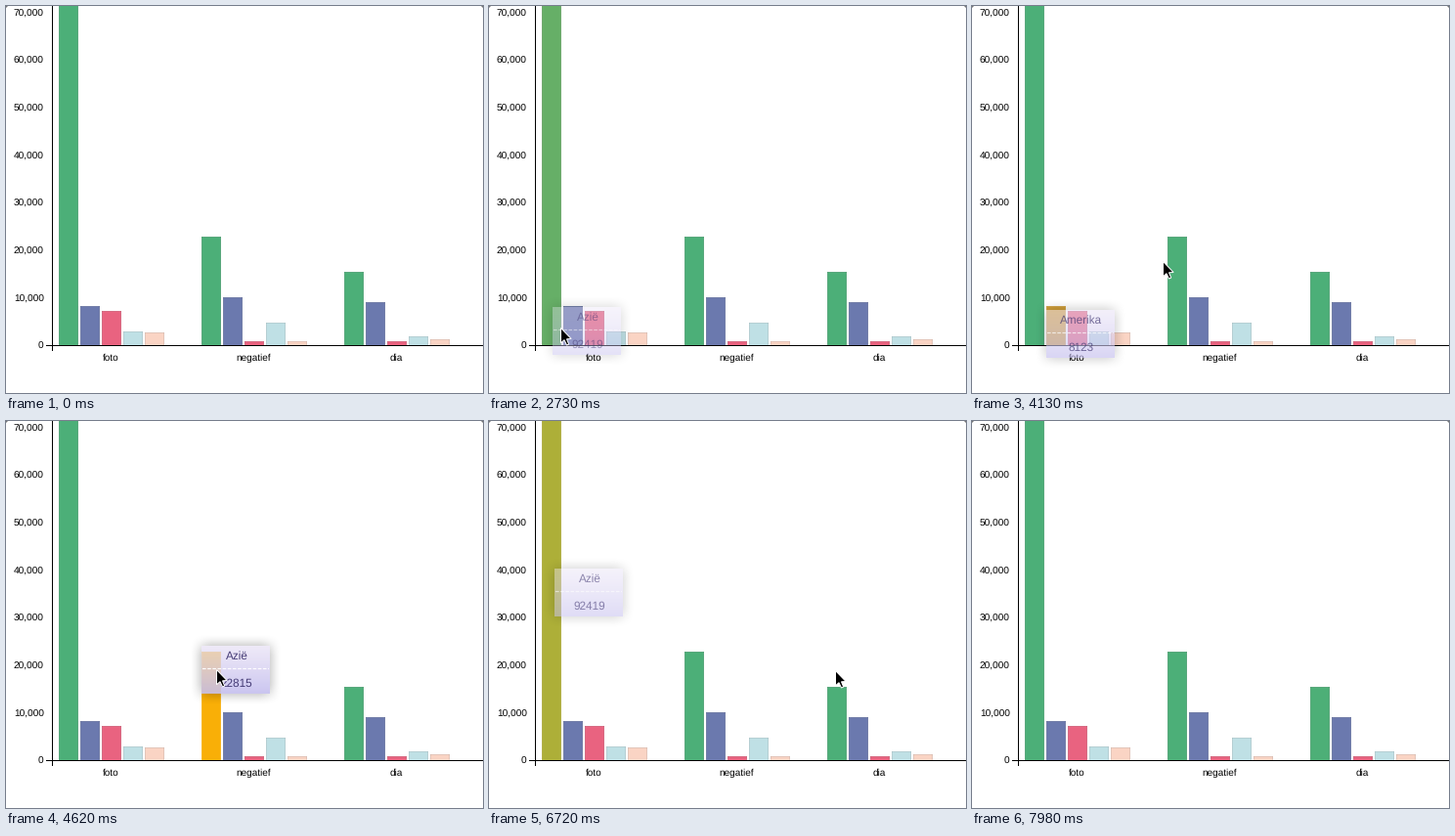
Animation, 488 px wide and 396 px high, one loop 8.19 s. Source, as a matplotlib script:

```python
import numpy as np
import matplotlib.pyplot as plt
from matplotlib.animation import FuncAnimation
from matplotlib.patches import Polygon, Rectangle

W, H, STEP, FRAMES = 488, 396, 70, 117
BASE, UNIT = 347, 48.67  # zero line and pixels per 10,000
TIP_W, TIP_H, PAD = 70, 49, 12

plt.rcParams["font.family"] = "Liberation Sans"
plt.rcParams["text.hinting"] = "none"


def rgb(r, g, b):
    return np.array([r, g, b]) / 255


COLORS = [rgb(76, 175, 120), rgb(107, 121, 174), rgb(233, 99, 128),
          rgb(191, 224, 229), rgb(250, 212, 196)]
HIGHLIGHT = rgb(252, 175, 5)
INK = rgb(62, 52, 112)

COUNTS = {"foto": [92419, 8123, 7200, 2870, 2670],
          "negatief": [22815, 10070, 820, 4730, 820],
          "dia": [15483, 9040, 820, 1850, 1230]}

# enter time, leave time, group, series
HOVERS = [(2550, 2790, "foto", 0), (2800, 3900, "foto", 1),
          (4170, 5280, "negatief", 0), (5770, 6460, "foto", 0),
          (6830, 7500, "dia", 0)]
NAMES = ["Azië", "Amerika"]

# time, x, y where the pointer turns or rests
STOPS = np.array([
    (840, 104, 400), (1540, 65, 336), (2550, 65, 336), (2730, 73, 329),
    (2800, 76, 339), (3000, 87, 331), (3850, 87, 331), (4170, 200, 258),
    (4400, 215, 254), (5180, 215, 254), (5770, 67, 179), (5950, 55, 158),
    (6400, 55, 158), (6720, 354, 255), (6830, 346, 288), (7420, 346, 288),
    (7630, 349, 420)])

ARROW = np.array([(0, 0), (0, 15.3), (3.5, 12.2), (6, 17.5), (8.2, 16.6),
                  (6, 11.3), (10.6, 11)]) + 0.5


def pointer_at(t):
    times, points = STOPS[:, 0], STOPS[:, 1:]
    t = np.clip(t, times[0], times[-1])
    i = min(np.searchsorted(times, t, "right"), len(times) - 1)
    u = (t - times[i - 1]) / (times[i] - times[i - 1])
    spot = points[i - 1] + (points[i] - points[i - 1]) * u * u * (3 - 2 * u)
    # one quick sway away from the bar and back
    sway = 1 - np.cos(2 * np.pi * np.clip((t - 1960) / 350, 0, 1))
    return np.round(spot - sway * np.array([10.5, 15]))


def ease(u):
    u = min(max(u, 0), 1)
    return 4 * u ** 3 if u < 0.5 else 1 - 4 * (1 - u) ** 3


def faded(events, t):
    """Value after a chain of (start, goal, duration) transitions."""
    value = 0.0
    for i, (start, goal, duration) in enumerate(events):
        if t < start:
            break
        end = min(t, events[i + 1][0]) if i + 1 < len(events) else t
        value += (goal - value) * ease((end - start) / duration)
    return value


def transitions(hovers, fade_in, fade_out, peak):
    return [event for enter, leave, *_ in hovers
            for event in ((enter, peak, fade_in), (leave, 0, fade_out))]


def tooltip_image():
    ys, xs = np.mgrid[0:TIP_H + 2 * PAD, 0:TIP_W + 2 * PAD] + 0.5
    dx = np.abs(xs - TIP_W / 2 - PAD) - TIP_W / 2
    dy = np.abs(ys - TIP_H / 2 - PAD) - TIP_H / 2
    inside = (dx < 0) & (dy < 0)
    down = np.clip((ys - PAD) / TIP_H, 0, 1)

    def blur(d):
        return 0.5 - 0.5 * np.sin(np.pi / 2 * np.clip(d / 13, -1, 1))

    shadow = 0.36 * blur(dx) * blur(dy)
    image = np.zeros(xs.shape + (4,))
    tint = (rgb(232, 225, 246) * (1 - down[..., None])
            + rgb(196, 190, 238) * down[..., None])
    image[..., :3] = np.where(inside[..., None], tint, 0)
    image[..., 3] = np.where(inside, 0.74 + 0.2 * down, shadow)
    return image


fig = plt.figure(figsize=(W / 72, H / 72), dpi=72, facecolor="white")
ax = fig.add_axes([0, 0, 1, 1])
ax.axis("off")

bars = {}
for g, (label, counts) in enumerate(COUNTS.items()):
    left = 54 + 146 * g
    for s, count in enumerate(counts):
        height = round(count / 10000 * UNIT)
        bars[label, s] = ax.add_patch(Rectangle(
            (left + 22 * s + 0.25, BASE - height + 0.25), 19.5, height,
            fc=COLORS[s], ec=COLORS[s] * 0.82, lw=0.5, snap=False))
    ax.text(left + 53.5, 363, label, size=10, ha="center", va="baseline")

axis_style = dict(color="black", lw=1, snap=False, solid_capstyle="butt")
ax.plot([47.5, 47.5], [-5, 353], **axis_style)
ax.plot([41, W + 5], [BASE + 0.5] * 2, **axis_style)
for n in range(8):
    ax.text(38.7, BASE + 4 - n * UNIT, f"{n * 10000:,}", size=10.1,
            ha="right", va="baseline")
for x, side in ((0, 1), (W, -1)):
    ax.add_patch(Polygon([(x, 0), (x + 2 * side, 0), (x, 2)],
                         fc="#777777", lw=0))

tip_pixels = tooltip_image()
tip = ax.imshow(tip_pixels, extent=(0, 1, 1, 0), interpolation="nearest",
                aspect="auto", zorder=5)
divider, = ax.plot([], [], color="white", lw=1.2, dashes=(3, 1.3),
                   dash_capstyle="butt", snap=False, zorder=6)
name_text, value_text = [ax.text(0, 0, "", size=11.7, color=INK, ha="center",
                                 va="baseline", zorder=6) for _ in range(2)]
pointer = ax.add_patch(Polygon(ARROW, fc="black", ec="white", lw=1,
                               joinstyle="miter", zorder=9))
ax.set_xlim(0, W)
ax.set_ylim(H, 0)

TIP_EVENTS = transitions(HOVERS, 360, 560, 0.95)
BAR_EVENTS = {key: transitions([h for h in HOVERS if h[2:] == key],
                               540, 540, 1)
              for key in {h[2:] for h in HOVERS}}


def draw_tooltip(t):
    shown = [h for h in HOVERS if h[0] <= t]
    opacity = faded(TIP_EVENTS, t)
    visible = bool(shown) and opacity > 0.015
    for part in (tip, divider, name_text, value_text):
        part.set_visible(visible)
    if not visible:
        return
    enter, _, group, series = shown[-1]
    x, y = pointer_at(enter) - (0, 28)
    image = tip_pixels.copy()
    image[..., 3] *= opacity
    tip.set_data(image)
    tip.set_extent((x - PAD, x + TIP_W + PAD, y + TIP_H + PAD, y - PAD))
    divider.set_data([x + 1, x + TIP_W - 1], [y + 23.5, y + 23.5])
    divider.set_alpha(opacity)
    for part, text, dy in ((name_text, NAMES[series], 14),
                           (value_text, str(COUNTS[group][series]), 42)):
        part.set_text(text)
        part.set_position((x + TIP_W / 2 + 1, y + dy))
        part.set_alpha(opacity)


def update(frame):
    t = frame * STEP
    for key, events in BAR_EVENTS.items():
        k = faded(events, t)
        color = COLORS[key[1]]
        bars[key].set_facecolor(color * (1 - k) + HIGHLIGHT * k)
        bars[key].set_edgecolor(color * 0.82 * (1 - k) + HIGHLIGHT * k)
    draw_tooltip(t)
    pointer.set_xy(ARROW + pointer_at(t))
    return []


anim = FuncAnimation(fig, update, frames=FRAMES, interval=STEP, repeat=True,
                     repeat_delay=0, blit=False)
plt.show()
```
